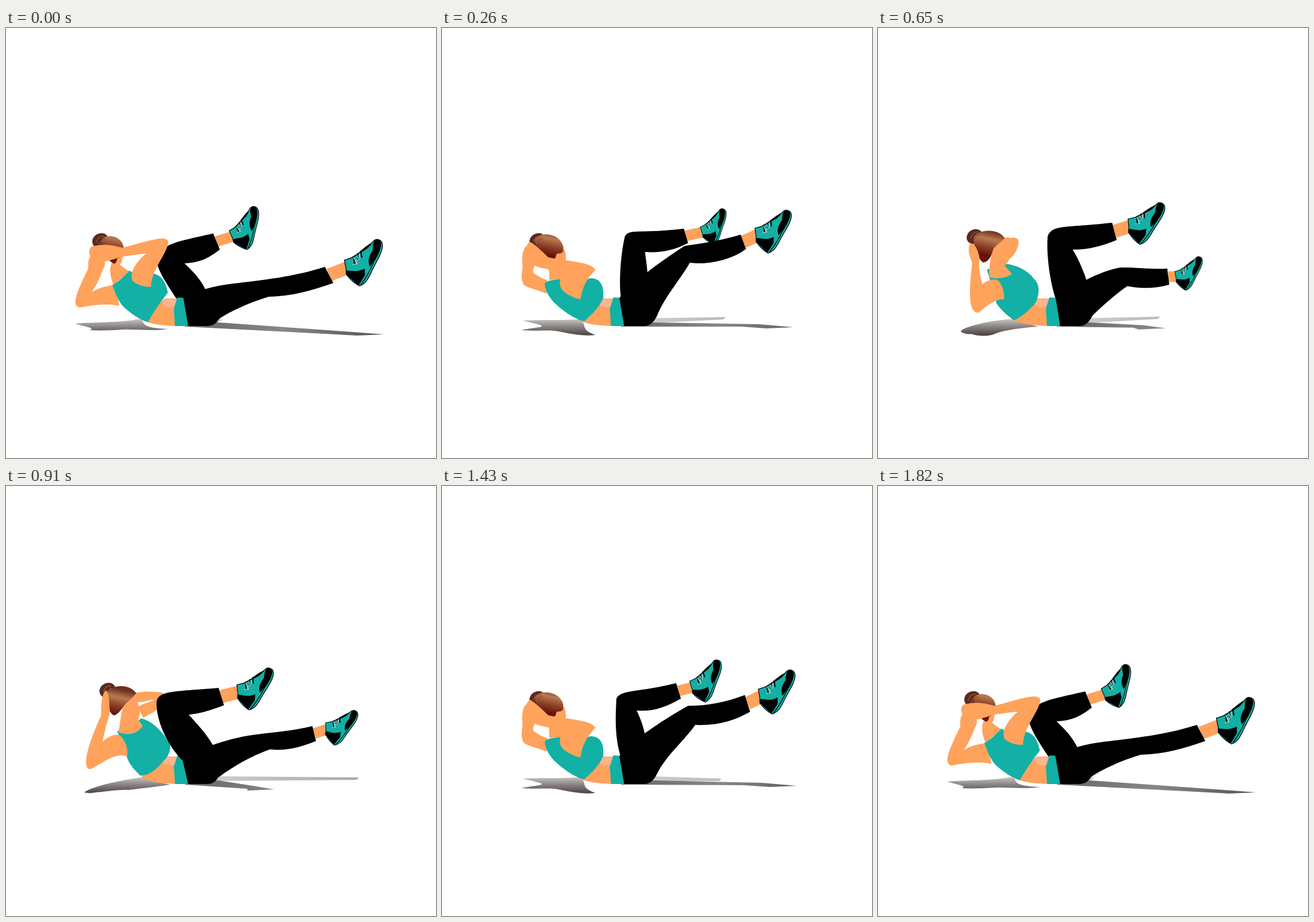
Animation, 720 px wide and 720 px high, one loop 1950 ms. Source, as an HTML page with a canvas:

```html
<!DOCTYPE html>
<html>
<head>
<meta charset="utf-8">
<style>
html, body { margin: 0; width: 100%; height: 100%; overflow: hidden; background: #fff; }
canvas { display: block; }
</style>
</head>
<body>
<canvas id="stage" width="720" height="720"></canvas>
<script>
const ctx = document.getElementById('stage').getContext('2d');
const STEP = 130, STEPS = 15;
const KEY_STEPS = [0, 2, 4, 7, 9, 11, 14];
const SKIN = '#ffa25c', TEAL = '#12b0a5', BLACK = '#000';

// Each part lists its poses; upper-body poses mirror on the way back.
const nearLeg = [
  'M297 452C320 440 345 432 380 428C430 422 480 417 534 400L548 427C510 440 480 449 440 450C400 462 370 478 357 487Q350 499 338 499L305 499Z',
  'M297 452C320 425 360 395 406 365C440 360 470 355 500 346L509 370C490 385 450 398 415 393C400 420 374 448 360 482Q352 499 338 499L305 499Z',
  'M299 452C293 420 296 370 300 342C310 322 330 330 410 320L417 349C390 361 360 367 336 365C345 385 362 450 361 478Q352 499 338 499L305 499Z',
  'M296 460C280 445 253 405 252 365C253 342 275 345 356 338L365 367C345 375 325 381 306 383C330 410 362 440 357 485Q350 499 338 499L305 499Z',
  'M299 452C293 420 302 370 305 345C312 322 335 330 414 319L422 347C395 358 370 366 343 365C345 385 360 450 361 478Q352 499 338 499L305 499Z',
  'M297 452C320 425 360 398 412 368C445 368 475 362 507 350L516 378C490 393 460 402 424 400C407 425 376 450 360 482Q352 499 338 499L305 499Z'
];
const farLeg = [
  'M290 460C270 430 253 405 252 388C262 362 275 360 347 344L358 371C340 385 325 393 299 394C315 410 350 440 340 490L305 498Z',
  'M300 455C295 420 301 370 306 350C312 335 330 345 405 336L412 360C390 372 365 377 340 375C341 390 350 420 340 490L305 498Z',
  'M300 455C320 430 370 400 397 394C415 394 440 402 470 403L472 431C450 435 430 434 405 428C395 440 375 462 359 480L305 498Z',
  'M300 455C320 440 380 420 420 416C450 412 480 410 513 402L519 427C495 437 470 444 442 441C410 452 380 470 357 487L305 498Z',
  'M300 455C320 425 370 372 400 366C425 366 455 362 475 357L481 381C460 395 430 401 402 399C392 415 373 447 359 480L305 498Z',
  'M300 455C288 420 291 380 292 356C300 340 330 346 392 330L400 356C375 370 355 378 326 376C335 395 350 430 340 490L305 498Z'
];
const torso = [
  'M178 430C190 424 198 415 206 406C220 415 230 410 243 411C262 412 268 428 271 443C262 455 250 470 238 492C225 490 205 475 195 465C185 452 182 440 178 430Z',
  'M172 428C178 420 190 424 198 418C215 425 235 425 248 419C265 418 272 432 270 452C262 470 250 480 238 491C222 488 200 472 186 458C178 448 173 440 172 428Z',
  'M181 400C190 405 200 398 212 398C235 402 250 408 257 418C270 430 266 450 263 460C255 472 240 482 229 492C215 482 205 475 195 462C200 440 182 425 181 400Z',
  'M186 410C200 410 215 400 226 389C245 393 262 412 270 425C278 432 276 445 268 456C255 470 245 484 225 485C215 475 208 468 203 456C200 440 192 425 186 410Z'
];
const nearArm = [
  'M243 433C243 405 270 378 272 358C268 345 235 358 195 368C180 364 165 360 143 366C135 375 140 390 160 392C175 390 190 383 200 382C215 380 230 378 234 378C222 388 205 408 212 424C225 433 235 434 243 433Z',
  'M232 454C236 430 243 420 257 405C250 392 220 392 178 384C168 374 155 362 147 358C138 365 138 380 147 390C155 402 170 402 178 404C185 415 195 418 203 415C194 422 196 436 206 443C215 449 225 454 232 454Z',
  'M215 455C200 458 190 468 182 478C160 480 162 430 157 396C150 388 145 380 148 370C155 365 165 375 168 388C168 395 169 400 170 404C174 415 178 422 181 430C188 424 198 422 205 424C212 430 216 445 215 455Z',
  'M203 453C185 445 165 462 142 474C125 475 138 430 159 385C160 372 158 352 167 342C174 348 172 362 174 378C172 388 170 394 168 400C165 412 163 420 162 428C170 420 182 415 190 417C200 425 205 440 203 453Z'
];
const farArm = [
  'M190 465C165 460 140 465 123 468C108 464 120 440 138 402C136 390 140 380 150 372C165 380 170 395 162 405C155 425 148 435 144 442C160 432 175 432 182 430Z',
  'M175 445C160 438 145 436 137 430C131 420 134 410 135 400C133 385 135 372 140 366C155 370 160 385 157 395C153 402 152 405 153 410C160 415 168 420 176 422Z',
  'M200 395C215 390 222 375 222 366C222 356 215 352 208 355C205 352 200 355 198 358C196 365 197 375 198 380C200 385 202 388 203 390C202 392 200 394 200 396Z',
  'M230 388C240 382 250 378 256 372C275 350 265 344 250 345C235 343 225 346 216 346C214 352 216 360 222 362C230 362 240 358 248 358C240 362 228 365 220 370Z'
];
const face = [
  'M180 430C172 410 172 395 185 380C195 372 196 380 195 385C194 392 192 396 190 396C198 402 203 405 206 408Z',
  'M180 422C178 402 180 385 190 370C200 362 208 372 207 380C209 390 206 392 200 392C205 400 207 408 208 420Z',
  'M184 420C185 400 184 380 200 355C210 348 214 362 216 375C221 384 217 398 207 399C210 404 218 412 222 417C212 420 200 423 184 420Z',
  'M188 412C193 395 190 375 205 352C217 345 220 360 222 368C225 380 224 388 221 392C223 394 226 396 229 402C222 412 208 420 188 412Z'
].map(path => path.replace(/^(M(\S+) (\S+?)C(?:[^C]*C){3}[^CZ]*)Z$/, (_, open, x, y) => `${open}C${x} ${y} ${x} ${y} ${x} ${y}Z`));
const hair = [
  'M160 356C162 344 195 345 197 368C198 380 192 384 186 386C186 392 182 396 180 394C168 388 160 375 160 356Z',
  'M154 354C163 340 198 343 203 366C204 378 200 377 192 378C190 386 187 390 182 388C170 382 160 372 154 354Z',
  'M156 352C165 338 200 338 209 354C203 362 196 362 192 370C190 382 187 395 174 397C164 390 158 372 156 352Z',
  'M168 348C178 330 208 332 218 347C210 358 200 362 195 372C190 378 185 384 180 384C172 378 166 365 168 348Z'
];
const bun = ['158 356', '160 356', '158 353', '170 342'];
const bodyShadow = [
  'M116 495C150 492 190 494 225 487C235 492 220 502 272 504C245 508 215 504 195 505C180 506 160 507 140 506C152 502 130 500 116 495Z',
  'M134 490C160 488 190 490 225 488C250 494 225 503 257 514C237 517 210 511 195 508C180 505 160 508 133 506C165 499 190 502 134 490Z',
  'M142 505C150 495 200 487 225 487C235 490 250 495 265 500C235 501 210 505 195 512C185 522 165 518 160 512C150 512 142 509 142 505Z',
  'M131 513C150 500 200 492 225 488C240 492 255 496 275 500C250 504 220 507 205 509C190 508 165 512 150 513C145 514 138 515 131 513Z'
];
// Shoes are placed by heel and toe; shadows end at a tip.
const nearFoot = ['592 432 629 357', '546 377 584 308', '454 356 496 290', '407 375 447 308', '460 356 501 290', '553 382 590 311'];
const farFoot = ['404 371 420 300', '455 362 474 304', '498 442 519 388', '550 434 589 379', '511 390 547 331', '441 362 466 293'];
const nearTip = ['633 513', '588 501', '498 500', '449 508', '503 499', '594 502'];
const farTip = ['362 490', '475 486', '413 483', '591 490', '548 487', '468 492'];

const numbers = text => text.match(/-?[\d.]+/g).map(Number);

function gradient(x0, y0, x1, y1, ...colors) {
  const g = ctx.createLinearGradient(x0, y0, x1, y1);
  colors.forEach((c, i) => g.addColorStop(i / (colors.length - 1), c));
  return g;
}
const hairFill = gradient(190, 340, 178, 394, '#6e3020', '#b97a50', '#8b4027', '#681209', '#681209');
const bodyShade = gradient(0, 486, 0, 516, '#ccc', '#85807e', '#433b39');
const nearShade = gradient(300, 0, 630, 0, '#666', '#8a8685', '#555');
const farShade = gradient(350, 0, 590, 0, '#ccc', '#bbb', '#aaa');

function fill(path, color) {
  ctx.fillStyle = color;
  ctx.fill(new Path2D(path));
}
function stroke(path, color, width) {
  ctx.strokeStyle = color;
  ctx.lineWidth = width;
  ctx.stroke(new Path2D(path));
}

function blender(step) {
  let i = 0;
  while (step > KEY_STEPS[i + 1]) i++;
  const f = (step - KEY_STEPS[i]) / (KEY_STEPS[i + 1] - KEY_STEPS[i]);
  const pose = (part, n) => part[n % 6] ?? part[6 - n];
  return part => {
    const to = numbers(pose(part, i + 1));
    let n = 0;
    return pose(part, i).replace(/-?[\d.]+/g, v => +v + (to[n++] - v) * f);
  };
}

function shoe([hx, hy, tx, ty]) {
  const dx = (tx - hx) / 100, dy = (ty - hy) / 100;
  const sole = 'M0 0C10 -9 20 -9 31 -9C50 -8 65 -10 77 -9C90 -8 98 -4 100 2';
  const body = sole + 'C101 9 99 13 93 15C86 17 80 17 74 20L45 38L33 50C28 46 24 44 20 40L9 34C4 24 0 14 0 0Z';
  ctx.save();
  ctx.transform(dx, dy, dy, -dx, hx, hy);
  fill(body, TEAL);
  fill('M0 2L9 34L16 37C22 28 20 18 36 6L24 0Z', BLACK);
  fill('M44 -1C54 10 66 9 76 8C86 13 94 16 99 10C102 2 96 -3 84 -4C70 -5 55 -4 44 -1Z', BLACK);
  fill('M38 43L45 38L74 20L90 16L78 23L56 33Z', BLACK);
  stroke('M34 27L48 38M44 24L56 33M53 21L64 29', BLACK, 2.5);
  stroke('M32 31L38 24L47 38M41 29L46 24L55 35M50 24L61 31', '#c9d3d3', 1.5);
  stroke('M3 -1C20 -5 45 -5 55 -4C75 -6 90 -4 97 1', BLACK, 1.5);
  stroke(body, BLACK, 1.5);
  ctx.restore();
}

function leg(path, foot, ankleWidth) {
  const p = numbers(path), [hx, hy, tx, ty] = foot;
  const dx = (tx - hx) / 100, dy = (ty - hy) / 100;
  const ankleX = hx + 24 * dx + 36 * dy, ankleY = hy + 24 * dy - 36 * dx;
  stroke(`M${(p[12] + p[14]) / 2} ${(p[13] + p[15]) / 2}L${ankleX} ${ankleY}`, SKIN, ankleWidth);
  shoe(foot);
  fill(path, BLACK);
}

function draw(step) {
  const at = blender(step);
  ctx.fillStyle = '#fff';
  ctx.fillRect(0, 0, 720, 720);

  let [x, y] = numbers(at(farTip));
  fill(`M350 486L${x} ${y - 2}L${x - 4} ${y + 2}L350 494Z`, farShade);
  [x, y] = numbers(at(nearTip));
  fill(`M300 494L356 493L${x * .8 + 60} ${y - 5}L${x} ${y}L${x - 45} ${y + 2}L${x * .7 + 90} ${y - 1}L300 500Z`, nearShade);
  fill(at(bodyShadow), bodyShade);

  fill(at(farArm), SKIN);
  leg(at(farLeg), numbers(at(farFoot)), 18);
  fill('M266 453L290 453L284 499C262 498 240 496 226 488Z', SKIN);
  fill('M266 454L288 454L284 466Q270 471 262 462Z', '#f9b68e');
  fill(at(torso), TEAL);
  fill(at(face), SKIN);

  [x, y] = numbers(at(bun));
  ctx.fillStyle = '#5c2a1d';
  ctx.beginPath();
  ctx.ellipse(x, y, 14, 12, -.5, 0, 7);
  ctx.fill();
  fill(at(hair), hairFill);
  stroke(`M${x - 7} ${y + 3}q4 -12 13 -10M${x - 2} ${y + 7}q2 -9 10 -10`, '#8d5037', 1.5);

  fill('M287 451L300 452L306 470L309 499L283 499L281 470Z', TEAL);
  leg(at(nearLeg), numbers(at(nearFoot)), 22);
  fill(at(nearArm), SKIN);
}

function tick() {
  draw(Math.floor(performance.now() / STEP) % STEPS);
  requestAnimationFrame(tick);
}
tick();
</script>
</body>
</html>
```
